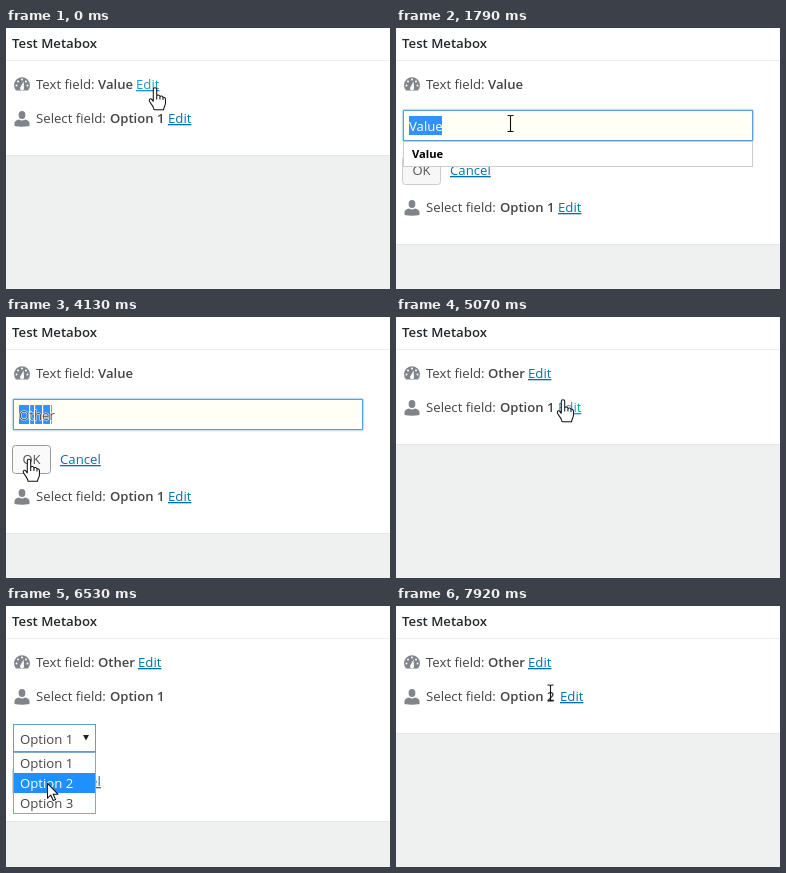
Write an HTML page that moves like this. It is 384 by 261 pixels and loops after 8000 ms.

```html
<!DOCTYPE html>
<html lang="en">
<head>
<meta charset="utf-8">
<title>Inline editing</title>
<style>
  html, body { margin: 0; width: 100%; height: 100%; overflow: hidden; background: #eff0f0; }
  svg { display: block; width: 384px; height: 261px; font: 13.2px "Open Sans", "Noto Sans", sans-serif; fill: #444; }
  text { white-space: pre; }
  .strong { font-weight: 600; font-size: 13.1px; }
  .title { font-weight: 600; fill: #23282d; }
  .link { fill: #0073aa; text-decoration: underline; }
  .link.hover { fill: #2494c8; }
  .icon { fill: #80858b; }
  .field { fill: #fff; stroke: #ddd; }
  .field.focus { stroke: #5b9dd9; }
  #input.focus { fill: #fffff6; filter: drop-shadow(0 0 1px rgba(30, 140, 190, .8)); }
  .button rect { fill: #f7f7f7; stroke: #ccc; }
  .button text { fill: #555; font-size: 13px; text-anchor: middle; }
  .button.hover rect { fill: #fafafa; stroke: #999; }
  .button.pressed rect { fill: #eee; stroke: #999; }
  .button.pressed text { transform: translateY(1px); }
  .cursor { fill: #fff; stroke: #111; stroke-width: 1.1; stroke-linejoin: round; }
  #beam { fill: none; }
</style>
</head>
<body>
<svg viewBox="0 0 384 261">
  <defs>
    <clipPath id="clip1"><rect id="reveal1" y="73" width="384" height="0"/></clipPath>
    <clipPath id="clip2"><rect id="reveal2" y="107" width="384" height="0"/></clipPath>
  </defs>
  <rect width="384" height="261" fill="#eff0f0"/>
  <rect id="panel" width="384" height="127" fill="#fff"/>
  <rect id="edge" y="127" width="384" height="1" fill="#e6e6e6"/>
  <rect y="32" width="384" height="1" fill="#eee"/>
  <text x="6" y="20" class="title">Test Metabox</text>

  <path class="icon" d="M10 62.5A8 8 0 1 1 22 62.5Z"/>
  <g fill="#fff">
    <circle cx="10.5" cy="57.5" r="1"/><circle cx="12" cy="53.500" r="1"/>
    <circle cx="16" cy="51.5" r="1"/><circle cx="20" cy="53.5" r="1"/><circle cx="21.5" cy="57.5" r="1"/>
    <path d="M17.6 53.5L18 60A2 2 0 1 1 14.2 59.5Z"/>
  </g>
  <text x="30" y="61">Text field:</text>
  <text id="value1" x="92" y="61" class="strong">Value</text>
  <text id="edit1" x="130" y="61" class="link">Edit</text>

  <g clip-path="url(#clip1)">
    <rect id="input" class="field" x="7.5" y="82.5" width="349" height="30"/>
    <g id="selection">
      <rect x="13" y="88" width="33" height="19" fill="#3390ff"/>
      <g id="slits" fill="#fffff6"></g>
    </g>
    <text id="typed" x="13" y="103" paint-order="stroke">Value</text>
    <g id="button1" class="button">
      <rect x="6.5" y="128.5" width="38" height="28" rx="3"/><text x="25.5" y="147">OK</text>
    </g>
    <text x="54" y="147" class="link">Cancel</text>
    <g id="suggest">
      <rect x="7.5" y="113.5" width="349" height="25" fill="#fff" stroke="#ccc"/>
      <text x="16" y="130" fill="#000" font-size="11.2" font-weight="700">Value</text>
    </g>
  </g>

  <g id="row2">
    <ellipse class="icon" cx="16" cy="87" rx="3.4" ry="4"/>
    <path class="icon" d="M8.5 98V95Q9 92 13 91.5Q16 93.5 19 91.5Q23 92 23.5 95V98Q16 99.5 8.5 98Z"/>
    <text x="30" y="95">Select field:</text>
    <text id="value2" x="104" y="95" class="strong">Option 1</text>
    <text id="edit2" x="162" y="95" class="link">Edit</text>
    <g clip-path="url(#clip2)">
      <rect id="select" class="field" x="7.5" y="118.5" width="82" height="27"/>
      <text id="chosen" x="14" y="138">Option 1</text>
      <path d="M77 129h6l-3 5.5z" fill="#222"/>
      <g id="button2" class="button">
        <rect x="6.5" y="161.5" width="38" height="28" rx="3"/><text x="25.5" y="180">OK</text>
      </g>
      <text x="54" y="180" class="link">Cancel</text>
    </g>
  </g>

  <g id="menu">
    <rect x="7.5" y="146.5" width="82" height="61" fill="#fff" stroke="#7fa9d6"/>
    <rect id="active" x="8" y="147" width="81" height="20" fill="#1e90ff"/>
    <text x="14" y="162">Option 1</text><text x="14" y="182">Option 2</text><text x="14" y="202">Option 3</text>
  </g>

  <g id="pointer">
    <path id="hand" class="cursor" transform="translate(-1 0) scale(.95)" d="M-1.8 1.2C-1.8-.8 1.8-.8 1.8 1.2V8C2.5 7 5 7.2 5.2 9C6 8 8.2 8.4 8.4 10C9.5 9.3 11 10 11 11.8V16C11 19 9 20 9 23H-1C-1 20-3.5 18-5.5 14.5C-7 12-5 10.5-3.4 12L-1.8 14ZM1.8 8V12M5.2 9V12M8.4 10V12.5"/>
    <path id="arrow" class="cursor" transform="scale(.95)" d="M.5.5V16L4 12.7 6.5 18.5 9 17.5 6.5 11.8H11.5Z"/>
    <path id="beam" class="cursor" d="M-3-8h2q1 0 1 1V7q0 1-1 1h-2M3-8H1q-1 0-1 1M3 8H1q-1 0-1-1"/>
  </g>
</svg>
<script>
const LOOP = 8000, TICK = 76;
const $ = id => document.getElementById(id);
const show = (id, on) => $(id).style.display = on ? "" : "none";
const mark = (id, name, on) => $(id).classList.toggle(name, on);
const set = (id, name, value) => $(id).setAttribute(name, value);
const write = (id, value) => { if ($(id).textContent !== value) $(id).textContent = value; };
const between = (t, from, to) => t >= from && t < to;

// Motion advances in ticks: the first step lands right at the start time.
const progress = (t, start, steps) =>
  Math.max(0, Math.min(1, (Math.floor((t - start) / TICK + 0.01) + 1) / steps));
const swing = p => 0.5 - Math.cos(p * Math.PI) / 2;
const slide = (t, open, close) => swing(progress(t, open, 4)) - swing(progress(t, close, 4));

// start, steps, x, y, shape
const moves = [
  [80, 2, 143, 56, "hand"],
  [320, 2, 140, 52, "beam"],
  [470, 6, 126.5, 103, "beam"],
  [1480, 5, 114.5, 95.5, "beam"],
  [3140, 3, 52, 111, "beam"],
  [3290, 1, 52, 111, "none"],
  [3670, 1, 7, 169, "arrow"],
  [3900, 3, 24, 142.5, "hand"],
  [4360, 5, 89, 104, "arrow"],
  [4750, 3, 168, 83, "hand"],
  [5380, 7, 76, 140, "arrow"],
  [5910, 2, 64, 136, "arrow"],
  [6220, 5, 41, 177, "arrow"],
  [6910, 3, 28, 171, "arrow"],
  [7530, 6, 154.5, 87, "beam"]
];
const keys = [[2170, "O"], [2410, "Ot"], [2580, "Oth"], [2650, "Othe"], [2820, "Other"]];
const slits = [23, 28, 36, 44];
$("slits").innerHTML = slits.map(x => `<rect x="${x}" y="88" width="1.2" height="19"/>`).join("");

function pointerAt(t) {
  let x = 150, y = 60, shape = "hand";
  for (const [start, steps, toX, toY, kind] of moves) {
    if (t < start) break;
    const p = progress(t, start, steps);
    x += (toX - x) * p;
    y += (toY - y) * p;
    shape = kind;
  }
  return { x, y, shape };
}

function render(t) {
  const grow1 = slide(t, 320, 4205) * 89;
  const grow2 = slide(t, 5150, 7300) * 88;
  const bottom = 127 + grow1 + grow2;
  set("panel", "height", bottom);
  set("edge", "y", bottom);
  set("reveal1", "height", grow1);
  set("reveal2", "height", grow2);
  set("row2", "transform", `translate(0 ${grow1})`);

  const saved1 = t >= 4205, saved2 = t >= 7300;
  write("value1", saved1 ? "Other" : "Value");
  set("edit1", "x", saved1 ? 132 : 130);
  show("edit1", !between(t, 320, 4205));
  mark("edit1", "hover", t < 320);
  write("value2", saved2 ? "Option 2" : "Option 1");
  set("edit2", "x", saved2 ? 164 : 162);
  show("edit2", !between(t, 5150, 7300));
  mark("edit2", "hover", between(t, 4900, 5150));

  const typedCount = keys.filter(([at]) => t >= at).length;
  const selected = t >= 1170;
  mark("input", "focus", t >= 1020);
  write("typed", typedCount ? keys[typedCount - 1][1] : "Value");
  $("typed").style.fill = selected && !typedCount ? "#fff" : "#555";
  $("typed").style.stroke = typedCount ? "#fffff6" : "none";
  show("selection", selected);
  [...$("slits").children].forEach((slit, i) => slit.style.display = i < typedCount ? "" : "none");
  show("suggest", between(t, 1250, 2260));
  mark("button1", "hover", t >= 4050);

  mark("select", "focus", t >= 6070);
  write("chosen", t >= 6680 ? "Option 2" : "Option 1");
  mark("button2", "hover", t >= 6910);
  mark("button2", "pressed", t >= 7230);

  const { x, y, shape } = pointerAt(t);
  const active = y >= 167 ? 1 : 0;
  show("menu", between(t, 6070, 6680));
  set("active", "y", 147 + active * 20);
  [...$("menu").querySelectorAll("text")].forEach((option, i) => option.style.fill = i === active ? "#fff" : "#444");

  set("pointer", "transform", `translate(${x} ${y})`);
  for (const kind of ["hand", "arrow", "beam"]) show(kind, kind === shape);
}

const begin = performance.now();
function frame() {
  render((performance.now() - begin) % LOOP);
  requestAnimationFrame(frame);
}
frame();
</script>
</body>
</html>
```
